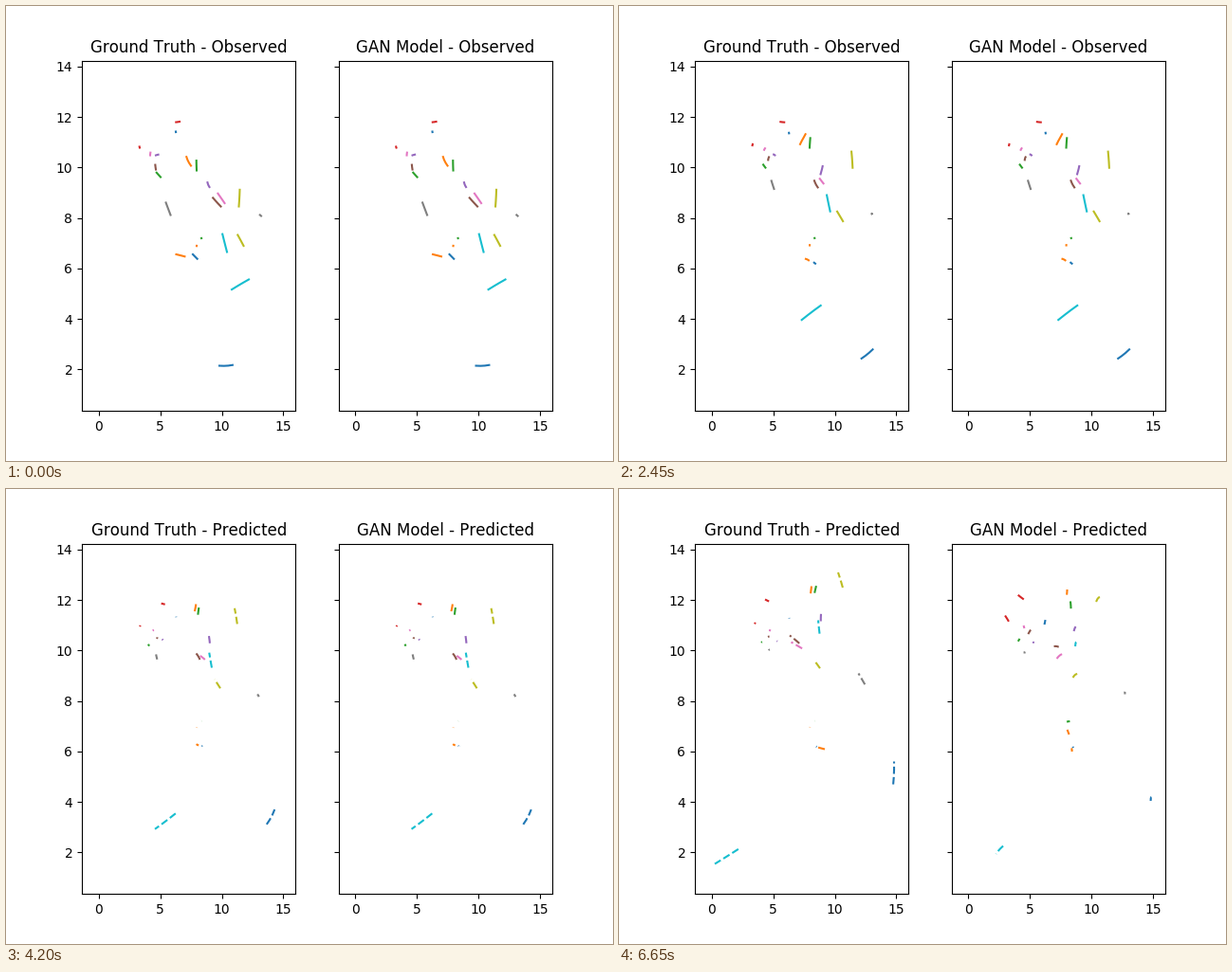
A matplotlib script for the animation above (7 s loop, 640x480 px).

```python
import numpy as np
import matplotlib.pyplot as plt
from matplotlib.animation import FuncAnimation

STEPS, SEEN, SPAN = 20, 12, 4          # frames, observed frames, points per trail
LAST, SPLIT = STEPS + SPAN - 2, 15     # final time step, last step the model sees
XLIM, YLIM = (-1.378, 16.002), (0.352, 14.231)
ORIGIN = np.array([80, 427.2])         # lower left corner of the left panel
SCALE = np.array([225.4545 / (XLIM[1] - XLIM[0]), -369.6 / (YLIM[1] - YLIM[0])])

truth, model = [], []


def to_data(pixels):
    return (pixels - ORIGIN) / SCALE + (XLIM[0], YLIM[0])


def curve(points):
    """Smooth path through points evenly spaced in time, one row per step."""
    p = np.array(points, float)
    slope = np.gradient(p, axis=0, edge_order=min(2, len(p) - 1))
    t = np.linspace(0, len(p) - 1, LAST + 1)
    i = np.minimum(t.astype(int), len(p) - 2)
    u = (t - i)[:, None]
    ease = u * u * (3 - 2 * u)
    return (p[i] + ease * (p[i + 1] - p[i])
            + u * (1 - u)**2 * slope[i] - u * u * (1 - u) * slope[i + 1])


def forecast(path, goal):
    """Keep the walker's last velocity, then bend steadily towards the goal."""
    start, speed = path[SPLIT], path[SPLIT] - path[SPLIT - 1]
    time = LAST - SPLIT
    s = np.arange(1, time + 1)[:, None]
    bend = (goal - start - speed * time) / time**2
    return np.vstack([path[:SPLIT + 1], start + speed * s + bend * s * s])


def walk(*points, goal):
    """Add a walker by a few key positions, in stage pixels of the left panel."""
    path = curve(points)
    truth.append(to_data(path))
    model.append(to_data(forecast(path, goal)))


walk((179, 132.5), (179.6, 136.5), goal=(178, 143))
walk((195, 168.5), (189.5, 151), (198, 132), (201, 117), (203, 102), goal=(202, 106))
walk((201, 173.5), (202, 136), (208.5, 100), goal=(206, 127))
walk((183, 122), (169, 122), (154, 116.5), goal=(148, 110))
walk((214.5, 191), (212, 181), (215, 166), (213, 147), (213, 131.5), goal=(209, 150))
walk((226.5, 211.5), (209, 190.5), (201, 174), (180, 154.5), goal=(188, 166))
walk((230.5, 208), (215, 186.5), (205.5, 176.5), (181.5, 161.5), goal=(191, 179))
walk((173.5, 220.5), (160, 182), (159, 169.5), goal=(157, 173.5))
walk((245.5, 211.5), (244.5, 148), (231, 88), goal=(232.5, 119))
walk((233, 259.5), (218, 194), (210, 138.5), goal=(210.5, 166))
walk((197, 262), (206, 271), (207, 271.3), (208.5, 272), goal=(208.5, 273))
walk((179.5, 262), (197.5, 267), (202.7, 270.3), (217, 274.5), goal=(207, 277))
walk((206, 245), (206.6, 244.7), goal=(201.5, 245.5))
walk((141, 149.5), (141, 145.5), (144, 141), goal=(136.5, 133.5))
walk((158, 157.5), (163.3, 156.7), (165.4, 159.3), (167, 160.7), goal=(166.5, 162.7))
walk((158, 172.5), (157.3, 162), (159.5, 156.5), (157, 156), goal=(163.5, 148.5))
walk((152, 157.5), (154.3, 149.8), (160, 149.5), goal=(156, 144))
walk((269, 221.5), (266.5, 219), (265.5, 217), (252.5, 194.5), goal=(263, 216.5))
walk((250.5, 253), (228, 213.5), (206, 181), goal=(208, 199))
walk((256, 288.5), (210.5, 317.5), (159.5, 357), (101, 395.5), goal=(127, 385))
walk((225, 379.5), (257, 371), (282.5, 340), (290, 287.5), goal=(290, 329))
walk((201, 253.2), (201.2, 251), goal=(204, 259))
walk((163, 180.5), (151.5, 166.5), (151, 161.5), goal=(152, 158))

plt.rcParams["text.kerning_factor"] = 6
fig, axes = plt.subplots(1, 2, sharey=True, figsize=(6.4, 4.8), dpi=100)
panels = []
for ax, name, paths in zip(axes, ("Ground Truth", "GAN Model"), (truth, model)):
    ax.set(xlim=XLIM, ylim=YLIM, xticks=range(0, 16, 5), yticks=range(2, 15, 2))
    lines = [ax.plot([], [], f"C{i % 10}", lw=1.5)[0] for i in range(len(paths))]
    panels.append((ax, name, paths, lines))


def draw(step):
    seen = step < SEEN
    for ax, name, paths, lines in panels:
        ax.set_title(f"{name} - {'Observed' if seen else 'Predicted'}")
        for line, path in zip(lines, paths):
            line.set_data(*path[step:step + SPAN].T)
            line.set_linestyle("-" if seen else "--")


anim = FuncAnimation(fig, draw, frames=STEPS, interval=350, init_func=lambda: draw(0),
                     repeat=True, repeat_delay=0)
plt.show()
```
